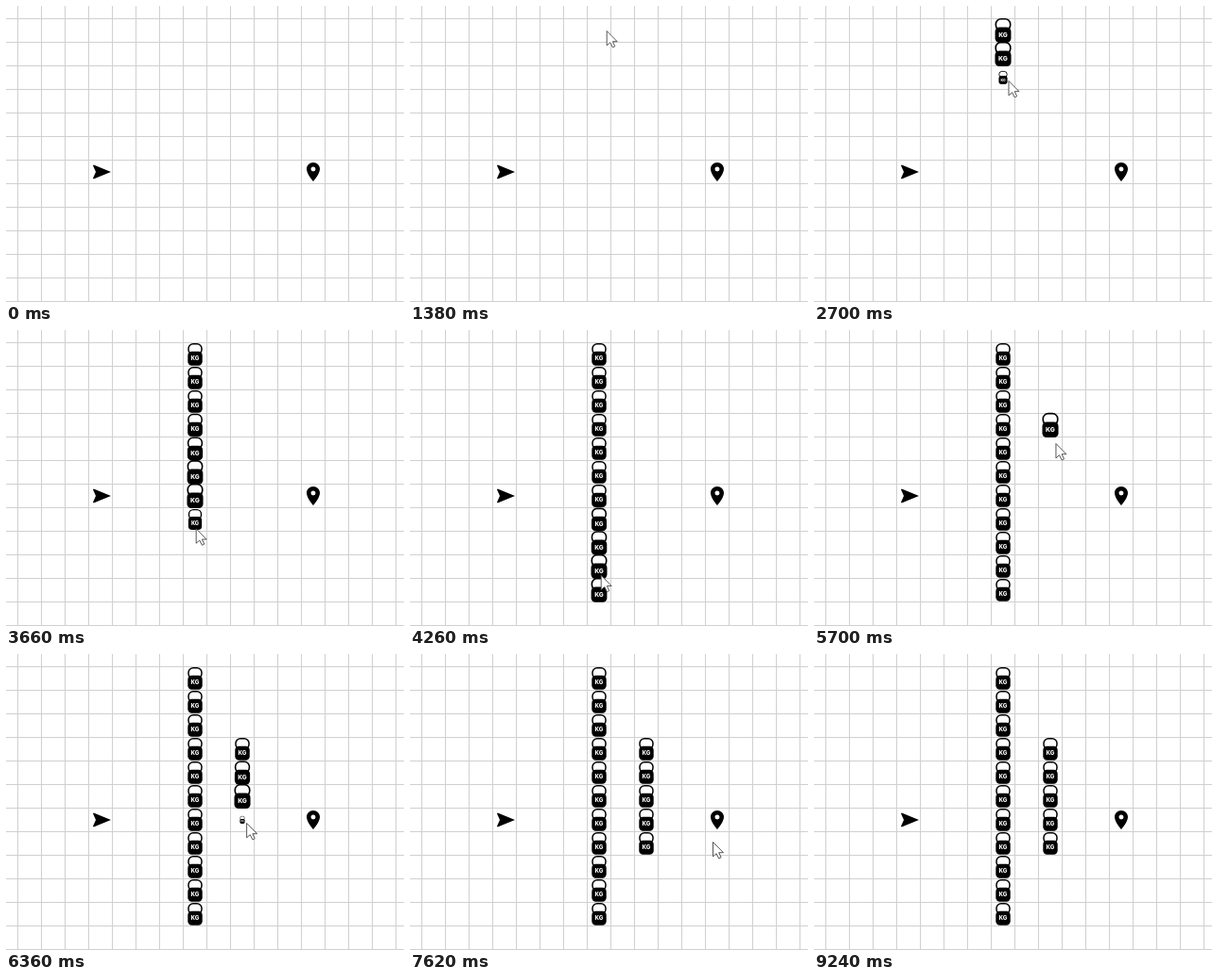
Write an HTML page that moves like this. It is 421 px wide and 314 px high and loops after 9.48 s.

```html
<!DOCTYPE html>
<html lang="en">
<head>
<meta charset="utf-8">
<title>Placing weights on a grid</title>
<style>
  html, body { margin: 0; width: 100%; height: 100%; overflow: hidden; background: #fff; }
  svg { display: block; width: 421px; height: 314px; }
  text { font: 800 6.1px Inter, Roboto, sans-serif; fill: #fff; text-anchor: middle; }
</style>
</head>
<body>
<svg viewBox="0 0 421 314">
  <defs>
    <pattern id="cell" x="12" y="13" width="25" height="25" patternUnits="userSpaceOnUse">
      <path d="M0 .5H25M.5 0V25" stroke="#d0d0d0"/>
    </pattern>
    <g id="weight">
      <rect x="-7" y="-11.2" width="14" height="11" rx="5" fill="#fff" stroke="#000" stroke-width="1.5"/>
      <rect x="-7.7" y="-3.2" width="15.4" height="15" rx="4.2"/>
      <text y="6.3">KG</text>
    </g>
  </defs>
  <rect width="421" height="314" fill="url(#cell)"/>
  <path transform="translate(113 164) rotate(90)" d="M12 2 4.5 20.29l.71.71L12 18l6.79 3 .71-.71z"/>
  <path transform="translate(313 164)" fill-rule="evenodd" d="M12 2C8.13 2 5 5.13 5 9c0 5.25 7 13 7 13s7-7.75 7-13c0-3.87-3.13-7-7-7zm0 9.5a2.5 2.5 0 0 1 0-5 2.5 2.5 0 0 1 0 5z"/>
  <g id="weights"></g>
  <path id="cursor" d="M0 0V15.4L3.6 12.2 6.2 17.4 8.6 16.3 6.2 11.2H11Z" fill="#fff" stroke="#444" stroke-width=".9"/>
</svg>
<script>
const LOOP = 9480, STEP = 60, CELL = 25;
const cursor = document.getElementById('cursor');
const layer = document.getElementById('weights');

const linear = u => u;
const smooth = u => u * u * (3 - 2 * u);
const mix = (a, b, u) => a + (b - a) * u;

// Each wall is one steady drag of the cursor, dropping a weight per row.
const walls = [
  { column: 7, row: 0, count: 11, start: 2302, pace: 179, from: [208, 25], to: [199, 270] },
  { column: 9, row: 3, count: 5, start: 5420, pace: 312, from: [256.5, 95.5], to: [254, 207] }
];

const weights = walls.flatMap(({ column, row, count, start, pace }) =>
  Array.from({ length: count }, (_, i) => {
    const node = document.createElementNS('http://www.w3.org/2000/svg', 'use');
    node.setAttribute('href', '#weight');
    layer.append(node);
    return { node, start: start + i * pace, x: 25 + column * CELL, y: 26 + (row + i) * CELL };
  }));

const glide = (start, end, to) => ({ start, end, to, ease: smooth });
const drag = ({ start, pace, count, to }) => ({ start, end: start + (count - 1) * pace, to, ease: linear });

const entry = [240, 276];
const moves = [
  glide(120, 1440, walls[0].from),
  drag(walls[0]),
  glide(4140, 4980, walls[1].from),
  drag(walls[1]),
  glide(6840, 7620, [320.5, 199.5]),
  glide(8700, 9240, [316, 322])
];

function cursorAt(t) {
  return moves.filter(move => t >= move.start).reduce((point, { start, end, to, ease }) => {
    const u = ease(Math.min(1, (t - start) / (end - start)));
    return point.map((value, axis) => mix(value, to[axis], u));
  }, entry);
}

// Pops up past full size, then settles.
function popScale(age) {
  if (age < 200) return mix(0.3, 1.11, 1 - (1 - age / 200) ** 2);
  return mix(1.11, 1, smooth(Math.min(1, (age - 200) / 850)));
}

function show(node, visible, transform) {
  node.style.display = visible ? '' : 'none';
  node.setAttribute('transform', transform);
}

function draw(now) {
  const t = Math.floor(now % LOOP / STEP) * STEP;
  for (const { node, start, x, y } of weights) {
    const age = Math.max(0, t - start);
    show(node, t >= start, `translate(${x} ${y}) scale(${popScale(age)})`);
  }
  show(cursor, t >= moves[0].start, `translate(${cursorAt(t)})`);
}

const begin = performance.now();
function tick() {
  draw(performance.now() - begin);
  requestAnimationFrame(tick);
}
tick();
</script>
</body>
</html>
```
